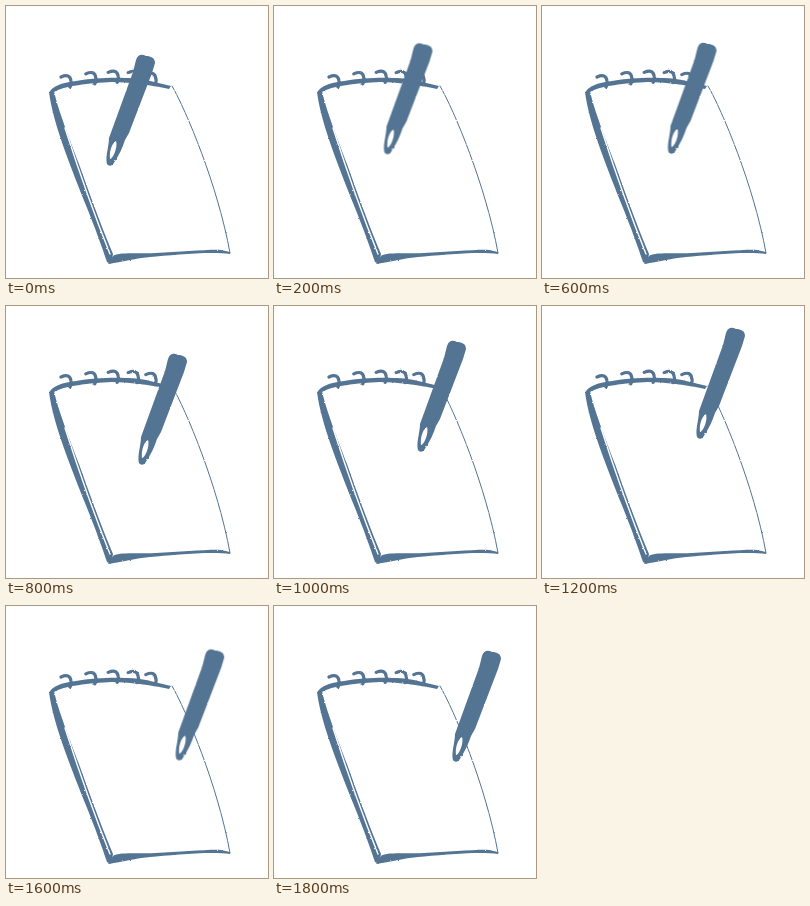
An HTML page for the animation above (1900 ms loop, 262 by 272 pixels).

```html
<!DOCTYPE html>
<html lang="en">
<head>
<meta charset="utf-8">
<title>Notepad and pen</title>
<style>
  html, body { margin: 0; width: 100%; height: 100%; overflow: hidden; background: #fff; }
  svg { display: block; width: 262px; height: 272px; }
  .ink { fill: #547493; }
  .line { fill: none; stroke: #547493; stroke-linecap: round; stroke-linejoin: round; }
  .gap { fill: none; stroke: #fff; stroke-linecap: round; }
</style>
</head>
<body>
<svg viewBox="0 0 262 272">
  <defs>
    <filter id="rough" filterUnits="userSpaceOnUse" x="0" y="0" width="262" height="272" color-interpolation-filters="sRGB">
      <feTurbulence type="fractalNoise" baseFrequency=".5" numOctaves="1" seed="4"/>
      <feDisplacementMap in="SourceGraphic" scale="2" xChannelSelector="R" yChannelSelector="G"/>
    </filter>
  </defs>

  <g filter="url(#rough)">
    <!-- left edge -->
    <path class="ink" d="M43 86L48 85C52 104 64 134 73 158C85 192 96 222 107 248L105 258L101 256C97 244 90 224 79 197C65 161 47 118 43 86Z"/>
    <path class="gap" stroke-width="1.4" d="M59 122C70 156 88 208 104 248"/>
    <!-- bottom edge -->
    <path class="ink" d="M102 258L107 250C112 246 130 248 150 247C175 246 205 243 215 244L224 246V248C205 245 165 249 144 251C130 252 116 256 102 258Z"/>
    <!-- right edge -->
    <path class="line" stroke-width="1" d="M166 80C180 104 212 180 224 247"/>
    <!-- top edge -->
    <path class="ink" d="M43 87C46 80 55 77 70 75C92 71 124 71 140 74L165 80L163 83C145 79 122 76 106 76C84 77 57 80 48 86Z"/>
    <g id="rings" class="line" stroke-width="3.2"></g>
  </g>

  <g id="pen">
    <path class="ink" filter="url(#rough)" fill-rule="evenodd" d="M130 54C132 48 136 48 140 50C145 50 149 52 149 57L146 67L123 127L119 134C116 143 113 149 109 155C107 160 103 161 101 158C99 152 103 140 103 132L107 121L127 66ZM110 135C106 137 103 146 104 153C107 153 112 141 110 135Z"/>
  </g>
</svg>
<script>
  // Rings sit closer together towards the right and follow the arc of the pad.
  const hook = i =>
    `M${55 + 26 * i - 1.2 * i * i} ${71 - 4 * i + 0.85 * i * i}q9 -4 10 4q1 3 -1 6`;
  const path = document.createElementNS('http://www.w3.org/2000/svg', 'path');
  path.setAttribute('d', [0, 1, 2, 3, 4].map(hook).join(''));
  document.getElementById('rings').append(path);

  // Turning points of the writing motion; the pen moves between them every 100 ms.
  const tick = 100, duration = 1900;
  const turns = [
    { t: 0, x: 0, y: 0 },
    { t: 400, x: 19, y: -23 },
    { t: 800, x: 32, y: -1 },
    { t: 1200, x: 54, y: -27 },
    { t: 1700, x: 73, y: 0 },
    { t: 1800, x: 78, y: -4 },
    { t: duration, x: 78, y: -4 }
  ];
  const frames = turns.map(({ t, x, y }, i) => {
    const next = turns[i + 1];
    return {
      offset: t / duration,
      transform: `translate(${x}px, ${y}px)`,
      easing: next ? `steps(${(next.t - t) / tick}, end)` : 'linear'
    };
  });
  document.getElementById('pen').animate(frames, { duration, iterations: Infinity });
</script>
</body>
</html>
```
